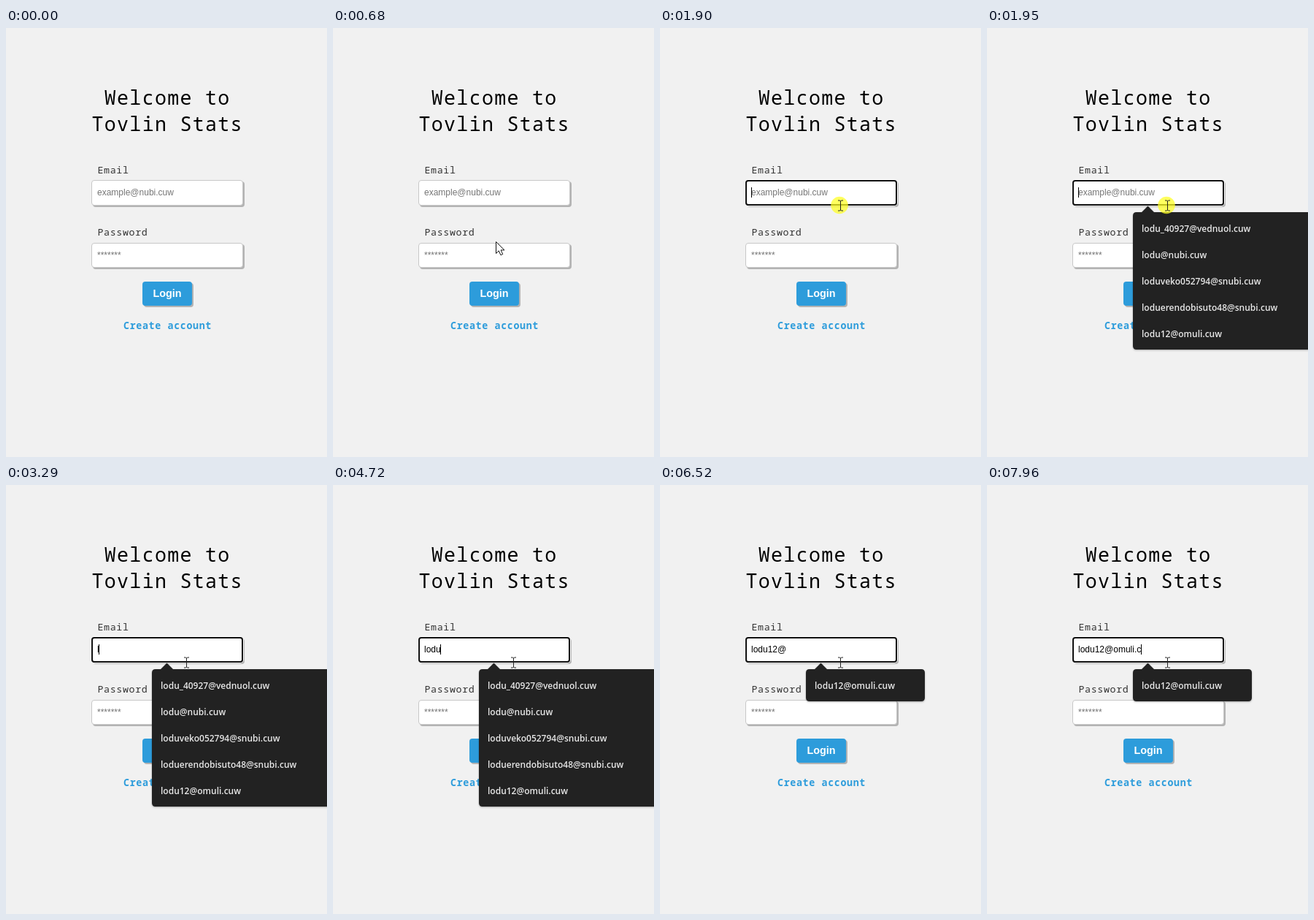
Animation of 440x587 px, one loop 8000 ms. Source, as an HTML page:

```html
<!DOCTYPE html>
<html lang="en">
<head>
<meta charset="utf-8">
<title>Login form</title>
<style>
  html, body { margin: 0; width: 100%; height: 100%; overflow: hidden; background: #f1f1f1; }
  svg { display: block; width: 100vw; height: 100vh; }
  text { white-space: pre; }
  .mono { font-family: "Noto Sans Mono", "DejaVu Sans Mono", monospace; }
  .title { font-size: 26.6px; letter-spacing: 1.32px; text-anchor: middle; }
  .label, .link { font-size: 13.3px; letter-spacing: .66px; }
  .label { fill: #333; }
  .link { fill: #2d9cdb; font-weight: 700; text-anchor: middle; }
  .field { font: 12px "Liberation Sans", Arial, sans-serif; }
  .hint { fill: #757575; }
  .button { font: bold 14.4px "Liberation Sans", Arial, sans-serif; fill: #fff; text-anchor: middle; }
  .option { font: 600 12px "Open Sans", "Noto Sans", sans-serif; fill: #e8e8e8; }
</style>
</head>
<body>
<svg viewBox="0 0 440 587" xmlns="http://www.w3.org/2000/svg">
  <defs>
    <filter id="soft" x="-5%" y="-5%" width="110%" height="110%">
      <feDropShadow dx="0" dy="1" stdDeviation="1" flood-opacity=".3"/>
    </filter>
  </defs>
  <rect width="440" height="587" fill="#f1f1f1"/>

  <g class="mono">
    <text class="title" x="221.2" y="105">Welcome to</text>
    <text class="title" x="221.2" y="141">Tovlin Stats</text>
    <text class="label" x="125.4" y="199">Email</text>
    <text class="label" x="125.4" y="284">Password</text>
    <text class="link" x="221.5" y="412">Create account</text>
  </g>

  <g fill="#b3b3b3">
    <rect x="119" y="210" width="208" height="35" rx="4"/>
    <rect x="119" y="296" width="208" height="34" rx="4"/>
    <rect x="189" y="349" width="68" height="33" rx="4"/>
  </g>
  <g fill="#fff" stroke="#c8c8c8">
    <rect x="117.5" y="208.5" width="207" height="34" rx="3.5"/>
    <rect x="117.5" y="294.5" width="207" height="33" rx="3.5"/>
  </g>
  <rect x="187" y="347" width="68" height="33" rx="4" fill="#2d9cdb"/>
  <text class="button" x="221" y="368">Login</text>
  <text class="field hint" x="125" y="315">*******</text>

  <g id="ring" fill="none">
    <rect x="116.5" y="207.5" width="209" height="36" rx="4.5" stroke="#fff"/>
    <rect x="118" y="209" width="206" height="33" rx="3" stroke="#101010" stroke-width="2"/>
  </g>
  <text id="hint" class="field hint" x="125" y="229">example@nubi.cuw</text>
  <text id="typed" class="field" x="125" y="229"></text>
  <rect id="caret" y="218" width="1" height="14"/>

  <g id="popup">
    <path id="panel" fill="#202020" filter="url(#soft)"/>
    <g id="options" class="option"></g>
  </g>

  <circle id="click" cx="246" cy="242.5" r="11.8" fill="#ffff20" fill-opacity=".72"/>
  <path id="arrow" d="M0 0V16L3.8 12.4 6.4 18.2 9.2 17 6.6 11.4H11.5Z" fill="#fff" stroke="#111"/>
  <path id="beam" d="M-3.5-6.5H-1L0-5.5 1-6.5H3.5M0-5.5V6.5M-3.5 7.5H-1L0 6.5 1 7.5H3.5" fill="none" stroke="#222"/>
</svg>
<script>
const LOOP = 8000;
const EMAIL = 'lodu12@omuli.cuw';
const SAVED = [
  'lodu_40927@vednuol.cuw',
  'lodu@nubi.cuw',
  'loduveko052794@snubi.cuw',
  'loduerendobisuto48@snubi.cuw',
  EMAIL
];

const FOCUS = 1900, POPUP = 1950, SHRINK = 4770, MATCH = 4790;
const KEYS = [3290, 3400, 3520, 3700, 4790, 4890, 6010, 6630, 6790, 6940, 7090, 7260, 7670, 7960];
const CARET_OFF = [[2390, 2910], [4220, 4720], [5410, 5990], [6520, 6630]];

// Pointer path: time, x, y
const PATH = [
  [370, 405, 573], [400, 376, 522], [430, 335, 452], [460, 294, 402],
  [500, 250, 350], [560, 232, 303], [620, 226, 286], [680, 223.5, 292.5],
  [1020, 223.5, 292.5], [1150, 226, 280], [1300, 237, 259], [1420, 245, 246], [1510, 247.5, 242.5]
];

const $ = id => document.getElementById(id);
const show = (id, on) => $(id).setAttribute('visibility', on ? 'visible' : 'hidden');
const within = (t, [a, b]) => t >= a && t < b;

const pen = document.createElement('canvas').getContext('2d');
pen.font = '12px "Liberation Sans", Arial, sans-serif';

function pointerAt(t) {
  const i = PATH.findIndex(p => p[0] > t);
  if (i < 0) return PATH[PATH.length - 1].slice(1);
  if (i === 0) return PATH[0].slice(1);
  const [t0, x0, y0] = PATH[i - 1], [t1, x1, y1] = PATH[i];
  const k = (t - t0) / (t1 - t0);
  return [x0 + (x1 - x0) * k, y0 + (y1 - y0) * k];
}

// Dark bubble with a pointer on its top edge; r rounds the right and bottom corners
function bubble(right, bottom, r) {
  return `M200 257Q200 252 205 252H212L220.5 243.5 229 252H${right - r}` +
    `Q${right} 252 ${right} ${252 + r}V${bottom - r}Q${right} ${bottom} ${right - r} ${bottom}` +
    `H${200 + r}Q200 ${bottom} 200 ${bottom - r}Z`;
}

function popupAt(t) {
  if (t < SHRINK) return { list: SAVED, shape: bubble(460, 440, 5) };
  if (t < MATCH) return { list: SAVED.slice(0, 1), shape: bubble(367, 302, 0) };
  return { list: [EMAIL], shape: bubble(363, 296, 5) };
}

let shownList = '';
function drawPopup(t) {
  show('popup', t >= POPUP);
  const { list, shape } = popupAt(t);
  $('panel').setAttribute('d', shape);
  const key = list.join();
  if (key === shownList) return;
  shownList = key;
  $('options').innerHTML = list.map((s, i) => `<text x="212" y="${279 + i * 36}">${s}</text>`).join('');
}

function drawPointer(t) {
  const [x, y] = pointerAt(t);
  const overField = y <= 243;
  show('arrow', t >= PATH[0][0] && !overField);
  show('beam', overField);
  $('arrow').setAttribute('transform', `translate(${x} ${y})`);
  $('beam').setAttribute('transform', `translate(${x} ${y})`);
  show('click', within(t, [1830, 1970]));
}

function drawField(t) {
  const typed = EMAIL.slice(0, KEYS.filter(k => t >= k).length);
  $('typed').textContent = typed;
  show('hint', !typed);
  show('ring', t >= FOCUS);
  show('caret', t >= FOCUS && !CARET_OFF.some(r => within(t, r)));
  $('caret').setAttribute('x', Math.floor(125 + pen.measureText(typed).width));
}

function draw(t) {
  drawField(t);
  drawPopup(t);
  drawPointer(t);
}

const start = performance.now();
function tick() {
  draw((performance.now() - start) % LOOP);
  requestAnimationFrame(tick);
}
tick();
</script>
</body>
</html>
```
